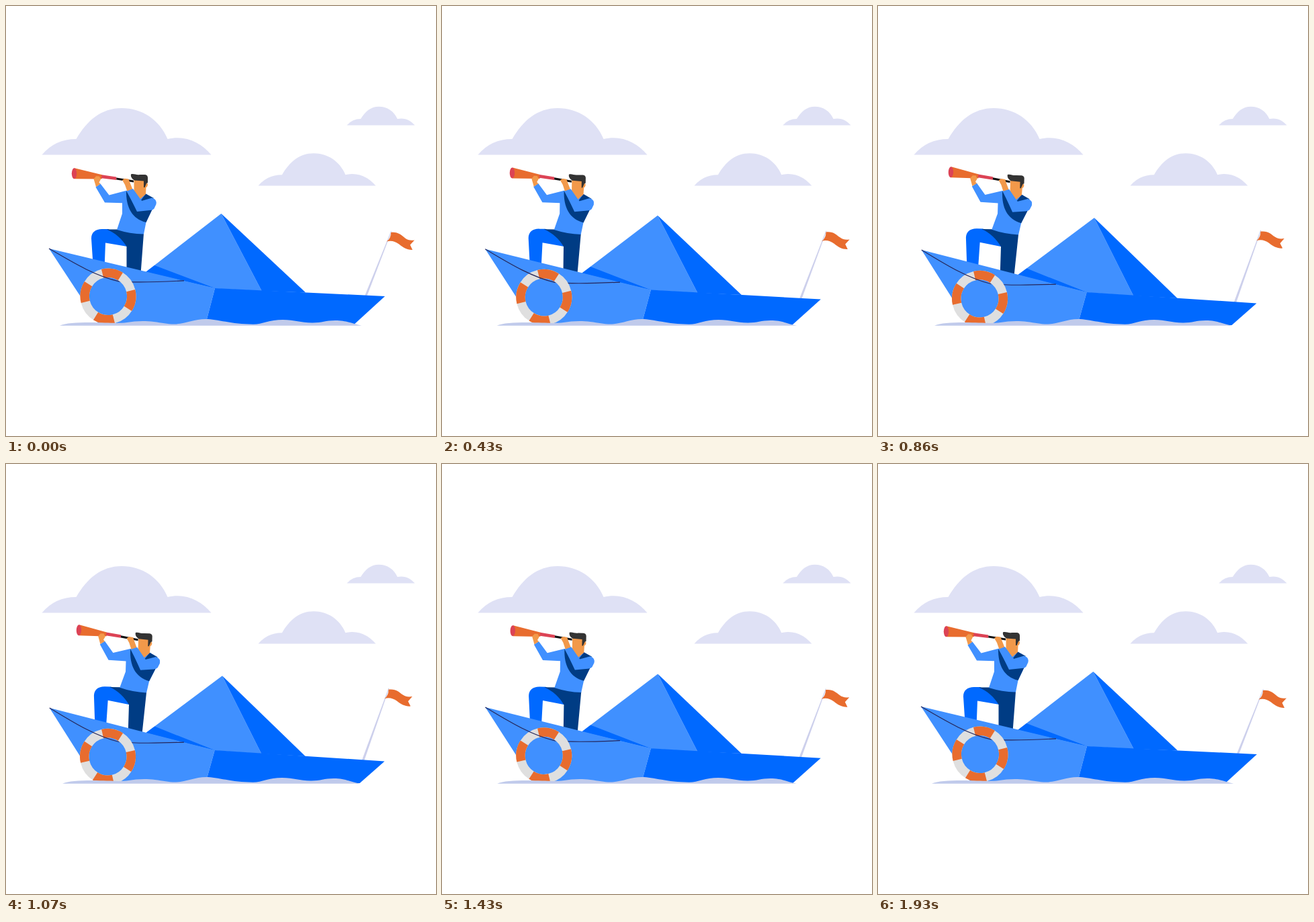
Animation of 640x640 px, one loop 2 s. Source, as an HTML page without scripts:

```html
<!DOCTYPE html>
<html lang="en">
<head>
<meta charset="utf-8">
<title>Paper boat lookout</title>
<style>
  @property --n { syntax: "<number>"; inherits: true; initial-value: 0; }

  html, body { margin: 0; width: 100%; height: 100%; overflow: hidden; background: #fff; }

  /* --n counts the steps of one loop, --p swings 0..1..0 */
  svg {
    display: block; width: 100%; height: 100%;
    --p: calc((1 - cos(var(--n) * 360deg / 27)) / 2);
    animation: tick 2s steps(28, end) -5ms infinite;
  }
  @keyframes tick { from { --n: 0; } to { --n: 28; } }

  .boat { transform-origin: -50px 405px; transform: rotate(calc(var(--p) * 1deg)); }
  .man  { transform-origin: 172px 470px; transform: rotate(calc(var(--p) * 1.85deg)); }
  .flag { transform-origin: 527px 452px; transform: rotate(calc(var(--p) * -1.85deg)); }
  .wave { transform-origin: 337px 475px; transform: scaleX(calc(1 - var(--p) * .0162)); }

  .light { fill: #4090ff; }
  .blue { fill: #0069ff; }
  .navy { fill: #003c84; }
  .skin { fill: #f2994a; }
  .orange { fill: #e86c2e; }
  .red { fill: #dc4355; }
  .dark { fill: #333; }
  .rope { fill: none; stroke: #25265a; stroke-width: 1.2; }
  .ring { fill: none; stroke-width: 13.5; }
</style>
</head>
<body>
<svg viewBox="0 0 640 640">
  <defs>
    <path id="cloud" d="M0 0Q19.5 -23.5 51 -23.5C67 -51 88.500 -69.500 118.500 -69.500C149.500 -69.500 175 -52 187 -23.500C214 -29.500 236 -18.500 252 0Z"/>
    <clipPath id="above"><path d="M0 0H640V475H0Z"/></clipPath>
  </defs>

  <g fill="#dfe1f5">
    <use href="#cloud" transform="translate(53.500 221.500)"/>
    <use href="#cloud" transform="translate(375.500 267.500) scale(.694)"/>
    <use href="#cloud" transform="translate(507.500 177.500) scale(.401)"/>
  </g>

  <g class="flag">
    <path fill="#cdd0ec" d="M573 335L574 335.300L529.500 452L526 451Z"/>
    <path class="orange" d="M573 337C584 336 588 341 594 345.500C598 348.500 602 349.300 608 348.500L601.500 355.500L605 363C597 363.300 591 359.500 585 354.500C579 350 573 348.500 566.500 350.500Q573 346 573 337Z"/>
  </g>

  <g class="man">
    <path class="blue" d="M127 346C127 337 133 332 143 332H152C163 337 174 346 180.500 358L148 352.500L146.500 392H130Z"/>
    <path class="navy" d="M150 332.500L165 332.500L205 338.500L200 405H179.500V358C173 347 163 338 150 332.500Z"/>

    <path class="light" d="M173 281L180 275L208 279.500L219 286L217 304L208.500 322L205 339.500Q184 339 165 333L173 309Z"/>
    <path class="light" d="M133.500 269.500L140.500 264.500L153.500 281.500L180 274.500L174 293.300L147 292.500Z"/>
    <path class="navy" d="M179 275C178.500 300 188 317 208.500 322L218 302L195 304Z"/>
    <path class="navy" d="M201 289L208 279.500L220 286L204 292Z"/>

    <path class="skin" d="M190.500 258H206L208 264Q211 262.500 211 266Q210.500 269.500 208.500 270L208 280L199.500 287.500L194 281L190.500 277Z"/>
    <path class="dark" d="M186 250.500C190 249 194 252 199 251H207Q211.500 251.500 211 257V263L209 264L206.500 270H205V260.500L191 259.500Q185 256 186 250.500Z"/>

    <path class="orange" d="M102 241.300L143 251.300V257L140 257.500L102 257.300Z"/>
    <ellipse class="red" cx="101.500" cy="249.300" rx="3.700" ry="8"/>
    <path class="red" d="M142.500 251.300L164.300 254.500V259L142 256.200Z"/>
    <path fill="#111" d="M164.300 255.400L190 259.500V262.500L164.300 258.600Z"/>

    <path class="skin" d="M130.500 257.500L134 253.300L139 253.500L141 258L138.500 262.500L140.500 264.800L134 269.200L132.500 264Z"/>
    <path class="skin" d="M173 259L176.500 256.800L182.500 257.500L184.500 263L188.500 273L180.500 276L177 266Z"/>
    <path class="light" d="M180 275.500L189 272L202 290L217.500 285.500Q225 288 223.500 295L220.500 301.500Q218.500 304 214 304L195 306Z"/>
  </g>

  <g clip-path="url(#above)">
    <g class="boat">
      <path class="light" d="M320.300 309L208 396L311 420.500L380.500 424Z"/>
      <path class="blue" d="M320.300 309L380.500 424L446 426.500Z"/>
      <path class="blue" d="M221 386L311 420L208 396Z"/>
      <path class="light" d="M64 361L311 420L294 485H145.500Z"/>
      <path class="blue" d="M311 420L564 432L506 485H294Z"/>

      <path class="rope" d="M168 409.800Q196 412.500 265 408.800"/>
      <g class="ring" transform="rotate(-104 152 432)">
        <circle cx="152" cy="432" r="34.750" stroke="#dfdfdf"/>
        <circle cx="152" cy="432" r="34.750" stroke="#e86c2e" pathLength="360" stroke-dasharray="46 44"/>
      </g>
      <path class="rope" d="M64 361C95 379 132 402 168 409.800"/>
    </g>
  </g>

  <path class="wave" fill="#c0caeb" d="M80 475.700C88 472 105 471 125 471C150 471 165 473 180 471C192 469 205 468 220 470C232 471.500 240 473.500 250 473.500C266 473.500 280 466 297 466C315 466 335 473.700 368 473.700C382 473.700 392 467 412 467C430 467 438 471.500 456 471.500C470 471.500 476 468 490 468C508 468 514 473 529.500 475.700Z"/>
</svg>
</body>
</html>
```
